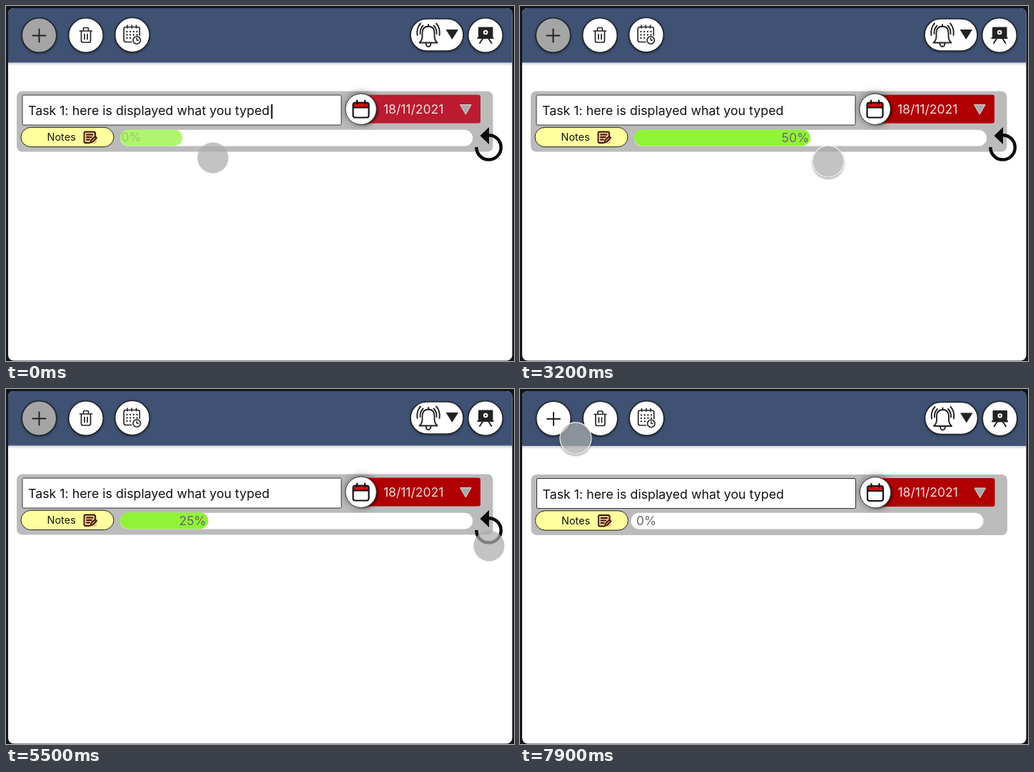
Write an HTML page that moves like this. It is 712 px wide and 498 px high and loops after 8000 ms.

```html
<!DOCTYPE html>
<html lang="en">
<head>
<meta charset="utf-8">
<title>Task progress</title>
<style>
html, body { margin: 0; width: 100%; height: 100%; overflow: hidden; background: #161616; }
svg { display: block; width: 712px; height: 498px; font-family: Inter, Roboto, sans-serif; }
.anim { animation: 8s linear infinite both; }
.line { fill: none; stroke: #222; stroke-width: 2; stroke-linecap: round; stroke-linejoin: round; }
.btn { fill: #fff; stroke: #23252b; stroke-width: 1.6; filter: drop-shadow(0 1px 1.5px #0006); }
.pct { font-size: 17.5px; fill: #666; }

/* small settling of the layout when returning to the start view */
#view { animation-name: settle; }
@keyframes settle {
  0%, 68.75% { transform: none; }
  73.75%, 100% { transform: translate(.5px, .5px); }
}
#add { animation-name: enable; }
@keyframes enable { 0%, 68.75% { fill: #a5a5a5; } 73.75%, 100% { fill: #fff; } }
#date { animation-name: date; }
@keyframes date { 0% { fill: #bc1b31; } 2.5%, 100% { fill: #b00004; } }
#track { animation-name: slide; }
@keyframes slide { 0%, 68.75% { transform: none; } 73.75%, 100% { transform: translate(-5px, -.5px); } }

#fill { animation-name: fill; }
@keyframes fill {
  0% { width: 87px; opacity: .72; animation-timing-function: ease-out; }
  2.5% { width: 124px; opacity: 1; }
  22.125% { width: 124px; animation-timing-function: cubic-bezier(0, 0, .58, 1); }
  27.125% { width: 247px; }
  53.75% { width: 247px; animation-timing-function: ease-out; }
  58.125% { width: 124px; }
  68.75% { width: 124px; opacity: 1; animation-timing-function: ease-out; }
  73.4% { width: 22px; opacity: 0; }
  100% { width: 22px; opacity: 0; }
}
#p0 { animation-name: p0; }
@keyframes p0 {
  0% { opacity: .3; transform: translateX(-1px); }
  2%, 68.75% { opacity: 0; transform: none; }
  73.75%, 100% { opacity: 1; transform: none; }
}
#p25 { animation-name: p25; }
@keyframes p25 {
  0% { opacity: 0; }
  2.5%, 22.125% { opacity: 1; }
  27.125%, 53.75% { opacity: 0; }
  58.125%, 68.75% { opacity: 1; }
  73.75%, 100% { opacity: 0; }
}
#p50 { animation-name: p50; }
@keyframes p50 {
  0%, 22.125% { opacity: 0; }
  27.125%, 53.75% { opacity: 1; }
  58.125%, 100% { opacity: 0; }
}
#undo { animation-name: leave; }
@keyframes leave { 0%, 68.75% { opacity: 1; } 73.75%, 100% { opacity: 0; } }
#editing { animation: editing 8s step-end infinite; }
@keyframes editing { 0% { opacity: 1; } 68.75%, 100% { opacity: 0; } }
#caret { animation: blink 1s step-end infinite; }
@keyframes blink { 0% { opacity: 1; } 15% { opacity: 0; } 65%, 100% { opacity: 1; } }

#pointer { animation-name: move; animation-timing-function: ease-in-out; }
@keyframes move {
  0%, 1.9% { transform: translate(290px, 213px); }
  7.5% { transform: translate(301px, 222px); }
  13% { transform: translate(304px, 222px); }
  20.5%, 24.5% { transform: translate(379px, 217px); }
  34%, 44% { transform: translate(432px, 218px); }
  52.5%, 69% { transform: translate(677px, 220px); }
  73.5%, 75% { transform: translate(688px, 164px); animation-timing-function: cubic-bezier(.5, 0, .8, .7); }
  80% { transform: translate(580px, 303px); animation-timing-function: cubic-bezier(.2, .3, .5, 1); }
  86.25% { transform: translate(122px, 202px); }
  88% { transform: translate(117px, 192px); }
  97.5% { transform: translate(88px, 61px); animation-timing-function: linear; }
  98.75% { transform: translate(78px, 69px); }
  100% { transform: translate(75px, 70px); }
}
#ring { animation: ring 8s step-end infinite; }
@keyframes ring {
  0% { opacity: 0; }
  2.5% { opacity: 1; }
  20.6% { opacity: 0; }
  24.4% { opacity: 1; }
  53% { opacity: 0; }
  57% { opacity: 1; }
  67.5% { opacity: 0; }
  71%, 100% { opacity: 1; }
}
</style>
</head>
<body>
<svg viewBox="0 0 712 498">
  <defs>
    <clipPath id="page"><rect x="3" y="3" width="706.5" height="494.5" rx="8"/></clipPath>
    <filter id="soft" x="-50%" y="-50%" width="200%" height="200%"><feGaussianBlur stdDeviation="5"/></filter>
    <filter id="blur" x="-30%" y="-30%" width="160%" height="160%"><feGaussianBlur stdDeviation="1.6"/></filter>
    <mask id="rim">
      <rect x="-40" y="-40" width="80" height="80" fill="#fff"/>
      <circle r="22" fill="#000"/>
    </mask>
  </defs>

  <rect width="712" height="498" fill="#161616"/>
  <g clip-path="url(#page)">
    <rect width="712" height="498" fill="#fff"/>
    <g id="view" class="anim">
      <rect x="-2" y="78" width="716" height="4" fill="#000" opacity=".16" filter="url(#blur)"/>
      <rect x="-2" y="-2" width="716" height="81.4" fill="#3f5274"/>

      <g class="btn">
        <circle id="add" class="anim" cx="46.5" cy="41" r="24.3"/>
        <circle cx="112" cy="41" r="24.3"/>
        <circle cx="177" cy="40.5" r="24.3"/>
        <rect x="567" y="18" width="74" height="45" rx="22.5"/>
        <circle cx="672" cy="41" r="24.3"/>
      </g>

      <path class="line" stroke-width="2.6" d="M37.5 41.5h18M46.5 32.5v18"/>

      <!-- bin -->
      <path class="line" style="stroke-width:1.7" d="M103.5 35h17M108.5 35v-3.2q0-1.3 1.300-1.300h4.400q1.300 0 1.300 1.300v3.200M105.500 35v13.500q0 2.500 2.500 2.500h8q2.500 0 2.500-2.500v-13.500M110 39.500v7M114 39.500v7"/>

      <!-- schedule -->
      <path class="line" style="stroke-width:1.600" d="M176 50.500h-8q-2.800 0-2.800-2.800v-15.400q0-2.800 2.800-2.800h16.500q2.800 0 2.800 2.800v9M170 27v4M176.300 27v4M182.600 27v4"/>
      <path class="line" style="stroke-width:2.300" stroke-dasharray="0 4.700" d="M169.500 36h15M169.500 40.500h15M169.500 45h8"/>
      <circle class="line" style="stroke-width:1.600;fill:#fff" cx="183.300" cy="48" r="5.200"/>
      <path class="line" style="stroke-width:1.400" d="M183.300 45v3h2.400"/>

      <!-- bell -->
      <path class="line" style="stroke-width:1.900" d="M579.500 51.500q4-3.500 4-9v-5q0-8.500 8.500-9 8.500.5 8.500 9v5q0 5.500 4 9zM588.500 52.500q.5 4.500 3.500 4.500t3.500-4.500M592 28.500v-2.500M580.500 39q-.5-7 4-11.500M603.500 39q.5-7-4-11.500M576.500 41q-1.500-10 4.500-16.500M607.500 41q1.500-10-4.500-16.500"/>
      <path d="M616.500 33h17.500l-8.750 14z" fill="#222"/>

      <!-- board -->
      <rect x="662" y="29.500" width="20.500" height="16" rx="1" fill="#222"/>
      <circle cx="672.200" cy="37" r="3.300" fill="#fff"/>
      <circle cx="672.200" cy="37" r="1.200" fill="#222"/>
      <path class="line" d="M668 46l-4 6M676.500 46l4 6"/>
      <path d="M660.500 45h23" stroke="#222" stroke-width="2"/>

      <rect x="15" y="119.500" width="667.500" height="85" rx="8" fill="#bbb"/>
      <rect x="23" y="125" width="447" height="42" rx="1.500" fill="#fff" stroke="#333"/>
      <text x="31" y="153" font-size="17.800" fill="#111">Task 1: here is displayed what you typed</text>
      <g id="editing"><rect id="caret" x="371.500" y="138" width="2" height="20" fill="#000"/></g>

      <!-- date -->
      <circle cx="498" cy="144" r="24" opacity=".32" filter="url(#soft)"/>
      <rect id="date" class="anim" x="500" y="124.500" width="165" height="40" rx="3"/>
      <circle cx="501" cy="146" r="21" opacity=".5" filter="url(#blur)"/>
      <circle cx="497.500" cy="144.700" r="21.700" fill="#fff" stroke="#333"/>
      <path d="M486.500 142v-4q0-2.500 2.500-2.500h17q2.500 0 2.500 2.500v4z" fill="#d80a14"/>
      <rect class="line" style="stroke:#111;stroke-width:2.200" x="486.500" y="135.500" width="22" height="21" rx="3"/>
      <path class="line" style="stroke:#111;stroke-width:2.200" d="M487 142.500h21M492 132.500v4.500M503 132.500v4.500"/>
      <text x="529" y="150.800" font-size="17.500" fill="#eadede">18/11/2021</text>
      <path d="M636.500 138.500h15.500l-7.750 13.500z" fill="#aaa" stroke="#ddd" stroke-width="1"/>

      <!-- notes -->
      <rect x="21" y="170.300" width="130" height="27.300" rx="13.600" fill="#ffff9f" stroke="#222"/>
      <text x="57.500" y="189" font-size="14.500" fill="#111">Notes</text>
      <rect x="109" y="176" width="18" height="17" rx="2" fill="#f8c288"/>
      <path class="line" style="stroke:#33170c;stroke-width:1.800" d="M117 192h-5.500q-2 0-2-2v-11.500q0-2 2-2h11.500q2 0 2 2v4M113 180.500h8.500M113 184h7M113 187.500h4M118.500 191.500l1-3.500 5.500-5 2 2-5.500 5.500z"/>

      <!-- progress -->
      <rect id="track" class="anim" x="160" y="173.800" width="494" height="22.700" rx="11.350" fill="#fff"/>
      <rect id="fill" class="anim" x="160" y="173.300" width="124" height="22.900" rx="11.450" fill="#90f337"/>
      <g class="pct">
        <text id="p0" class="anim" x="162.500" y="190">0%</text>
        <text id="p25" class="anim" x="242.500" y="191">25%</text>
        <text id="p50" class="anim" x="366.500" y="191">50%</text>
      </g>

      <g id="undo" class="anim">
        <path d="M676 181.200A17.200 17.200 0 1 1 659.400 198" fill="none" stroke="#0b0b0b" stroke-width="4.500"/>
        <path d="M664.500 182l12.500-12v24z" fill="#0b0b0b"/>
      </g>
    </g>
  </g>

  <g id="pointer" class="anim">
    <g id="ring">
      <circle cy="2" r="22.500" opacity=".38" filter="url(#blur)" mask="url(#rim)"/>
      <circle r="22" fill="none" stroke="#fff" stroke-width="1.300"/>
    </g>
    <circle r="21.700" fill="#acacac" opacity=".72"/>
  </g>
</svg>
</body>
</html>
```
